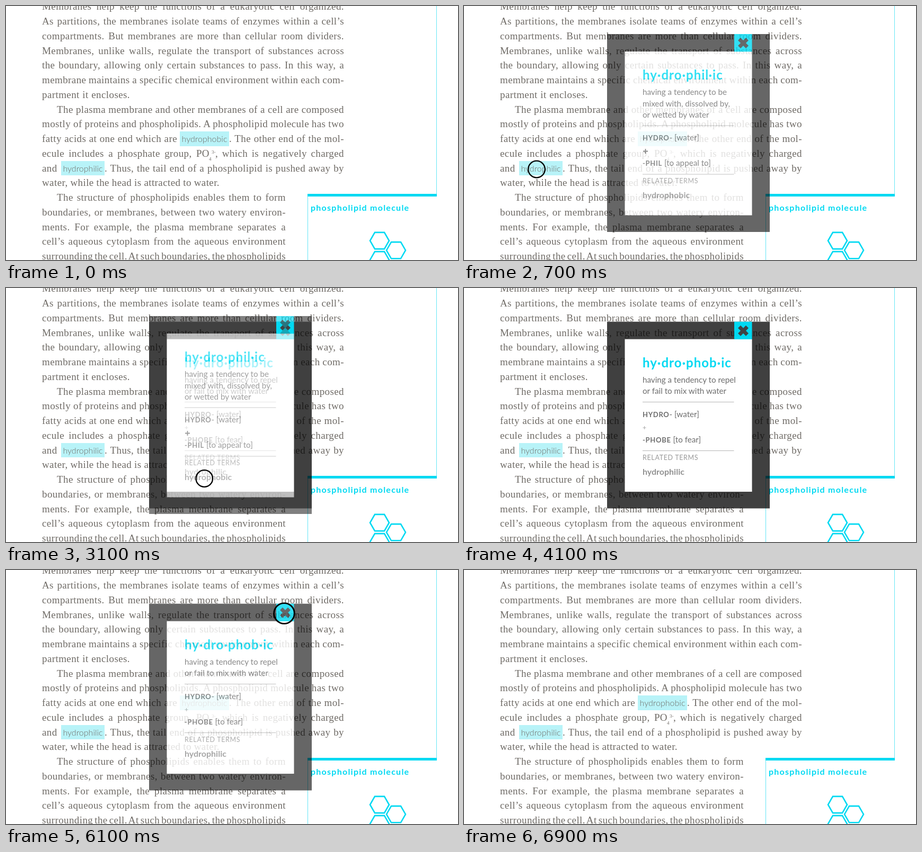
An HTML page that plays this animation: 853x480 px, repeating every 7400 ms.

```html
<!DOCTYPE html>
<html lang="en">
<head>
<meta charset="utf-8">
<title>Glossary pop-ups</title>
<style>
html, body { margin: 0; width: 100%; height: 100%; overflow: hidden; background: #fff; }
#stage { position: relative; width: 853px; height: 480px; overflow: hidden; }
.scene, .scene > svg, #taps { position: absolute; left: 0; top: 0; width: 853px; height: 480px; }
.scene { background: #fff; overflow: hidden; }
.line, .term, .mark { position: absolute; height: 27.75px; line-height: 27.75px; white-space: nowrap; color: #6f6b66; }
.line {
  font: 19px/27.75px "Liberation Serif", serif;
  letter-spacing: .4px; word-spacing: -3px;
  text-align: justify; text-align-last: justify;
}
.term {
  background: #b8f3f8; text-align: center;
  font: 300 16px/27.75px Lato, sans-serif;
}
.mark { font: 9px/12px "Liberation Serif", serif; height: 12px; }
svg text { font-family: Lato, sans-serif; font-size: 15.2px; fill: #6d6d6d; }
svg .caption { font-size: 16px; font-weight: 700; letter-spacing: 1.25px; fill: #00d9f2; }
svg .title { font-size: 24px; font-weight: 700; letter-spacing: 1px; fill: #00d9f2; }
svg .root { font-size: 13px; font-weight: 700; letter-spacing: .7px; }
svg .label { font-size: 12.5px; letter-spacing: .65px; fill: #999; }
svg .link { font-size: 16px; font-weight: 700; fill: #929292; }
</style>
</head>
<body>
<div id="stage"></div>
<script>
const LOOP = 7400, STEP = 100;
const CYAN = '#00d9f2';
const LEAD = 27.75, FIRST = -12.6;
const L = 68, INDENT = 96, R = 638, NARROW = 528;

// row, left edge, right edge, words
const LINES = [
  [0, L, R, 'Membranes help keep the functions of a eukaryotic cell organized.'],
  [1, L, R, 'As partitions, the membranes isolate teams of enzymes within a cell’s'],
  [2, L, R, 'compartments. But membranes are more than cellular room dividers.'],
  [3, L, R, 'Membranes, unlike walls, regulate the transport of substances across'],
  [4, L, R, 'the boundary, allowing only certain substances to pass. In this way, a'],
  [5, L, R, 'membrane maintains a specific chemical environment within each com-'],
  [6, L, 234, 'partment it encloses.'],
  [7, INDENT, R, 'The plasma membrane and other membranes of a cell are composed'],
  [8, L, R, 'mostly of proteins and phospholipids. A phospholipid molecule has two'],
  [9, L, 323, 'fatty acids at one end which are'],
  [9, 421, R, '. The other end of the mol-'],
  [10, L, 384, 'ecule includes a phosphate group, PO'],
  [10, 395, R, ', which is negatively charged'],
  [11, L, 99, 'and'],
  [11, 186, R, '. Thus, the tail end of a phospholipid is pushed away by'],
  [12, L, 403, 'water, while the head is attracted to water.'],
  [13, INDENT, NARROW, 'The structure of phospholipids enables them to form'],
  [14, L, NARROW, 'boundaries, or membranes, between two watery environ-'],
  [15, L, NARROW, 'ments. For example, the plasma membrane separates a'],
  [16, L, NARROW, 'cell’s aqueous cytoplasm from the aqueous environment'],
  [17, L, NARROW, 'surrounding the cell. At such boundaries, the phospholipids']
];

const rowTop = row => FIRST + LEAD * row;

function box(cls, x, y, width, text) {
  const style = `left:${x}px;top:${y}px;` + (width ? `width:${width}px` : '');
  return `<div class="${cls}" style="${style}">${text}</div>`;
}

const rect = (x, y, w, h, fill) =>
  `<rect x="${x}" y="${y}" width="${w}" height="${h}" fill="${fill}"/>`;

const text = (cls, x, y, words) => `<text class="${cls}" x="${x}" y="${y}">${words}</text>`;

const svg = body => `<svg viewBox="0 0 853 480">${body}</svg>`;

function hexagon(cx, cy, r = 18) {
  const points = [0, 1, 2, 3, 4, 5].map(i => {
    const a = i * Math.PI / 3;
    return `${(cx + r * Math.cos(a)).toFixed(2)},${(cy + r * Math.sin(a)).toFixed(2)}`;
  });
  return `<polygon points="${points.join(' ')}" fill="none" stroke="${CYAN}" stroke-width="2.6"/>`;
}

function page() {
  const lines = LINES.map(([row, x1, x2, words]) => box('line', x1, rowTop(row), x2 - x1, words));
  const terms = box('term', 328, rowTop(9), 93, 'hydrophobic') +
    box('term', 104, rowTop(11), 82, 'hydrophilic');
  const marks = box('mark', 383, 283, 0, '4') + box('mark', 388, 270, 0, '3-');
  const sidebar = rect(812, 0, 1, 357, '#66e6f6') + rect(569, 357, 1, 123, '#66e6f6') +
    rect(569, 355, 244, 5, CYAN) +
    text('caption', 575, 386.5, 'phospholipid molecule') +
    hexagon(705, 443.5) + hexagon(736, 461.7) + hexagon(705, 479.7);
  return lines.join('') + terms + marks + svg(sidebar);
}

// The upper part hangs from the top edge, the lower part from the bottom edge.
function card({ top, bottom, title, meaning, plus, root, gloss, related }) {
  const x = 337;
  const rule = y => rect(x, y, 172.5, 1, '#b4b4b4');
  const cross = `M519.5 ${top + 9.5}l15 15m0 -15l-15 15`;
  const rootLine = (y, name, note) =>
    `<text x="${x}" y="${y}">${name} ${note}</text>`;
  const bold = word => `<tspan class="root">${word}</tspan>`;
  return svg(
    rect(270, top, 307, bottom - top, 'rgba(0,0,0,.75)') +
    rect(303.5, top + 33, 240, bottom - top - 64.5, '#fff') +
    rect(510, top, 33.5, 33.3, CYAN) +
    `<path d="${cross}" stroke="#3f4345" stroke-width="7" fill="none"/>` +
    text('title', x, top + 86, title) +
    meaning.map((words, i) => text('', x, top + 115.3 + 21.4 * i, words)).join('') +
    rule(bottom - 201.5) +
    rootLine(bottom - 173, bold('HYDRO') + '-', '[water]') +
    plus(bottom - 152.5) +
    rootLine(bottom - 124.7, bold('-' + root), gloss) +
    rule(bottom - 109.5) +
    text('label', x, bottom - 92, 'RELATED TERMS') +
    text('link', x, bottom - 64, related)
  );
}

const plusSign = (cx, arm, width, color) => cy =>
  `<path d="M${cx - arm} ${cy}h${2 * arm}M${cx} ${cy - arm}v${2 * arm}" stroke="${color}" stroke-width="${width}"/>`;

const philic = card({
  top: 53, bottom: 427, title: 'hy·dro·phil·ic',
  meaning: ['having a tendency to be', 'mixed with, dissolved by,', 'or wetted by water'],
  plus: plusSign(342.5, 4.5, 1.8, '#6d6d6d'),
  root: 'PHIL', gloss: '[to appeal to]', related: 'hydrophobic'
});
const phobic = card({
  top: 63.7, bottom: 416.5, title: 'hy·dro·phob·ic',
  meaning: ['having a tendency to repel', 'or fail to mix with water'],
  plus: plusSign(340.5, 3, 1, '#aaa'),
  root: 'PHOBE', gloss: '[to fear]', related: 'hydrophilic'
});

// x, y, radius, line width, then fade-in and fade-out times
const TAPS = [
  [137, 308.5, 15.8, 2.3, 0, 300, 800, 1000],
  [374.3, 360, 15.8, 2.3, 2300, 2600, 3400, 3700],
  [525, 82, 19.3, 2.8, 5400, 5800, 6300, 6600]
];

const scene = body => `<div class="scene">${body}</div>`;
const circle = ([x, y, r, w]) =>
  `<circle cx="${x}" cy="${y}" r="${r}" fill="none" stroke="#000" stroke-width="${w}"/>`;

const base = page();
document.getElementById('stage').innerHTML =
  scene(base) + scene(base + philic) + scene(base + phobic) +
  `<svg id="taps" viewBox="0 0 853 480">${TAPS.map(circle).join('')}</svg>`;

const [, first, second] = document.querySelectorAll('.scene');
const circles = document.querySelectorAll('#taps circle');

const ramp = (t, from, to) => Math.min(1, Math.max(0, (t - from) / (to - from)));

function draw(t) {
  first.style.opacity = t < 5000 ? ramp(t, 300, 800) : 0;
  second.style.opacity = ramp(t, 2900, 3500) - ramp(t, 6000, 6500);
  TAPS.forEach(([, , , , in0, in1, out0, out1], i) => {
    circles[i].style.opacity = ramp(t, in0, in1) - ramp(t, out0, out1);
  });
}

const start = performance.now();
function tick() {
  const t = (performance.now() - start) % LOOP;
  draw(Math.floor(t / STEP) * STEP);
  requestAnimationFrame(tick);
}
tick();
</script>
</body>
</html>
```
